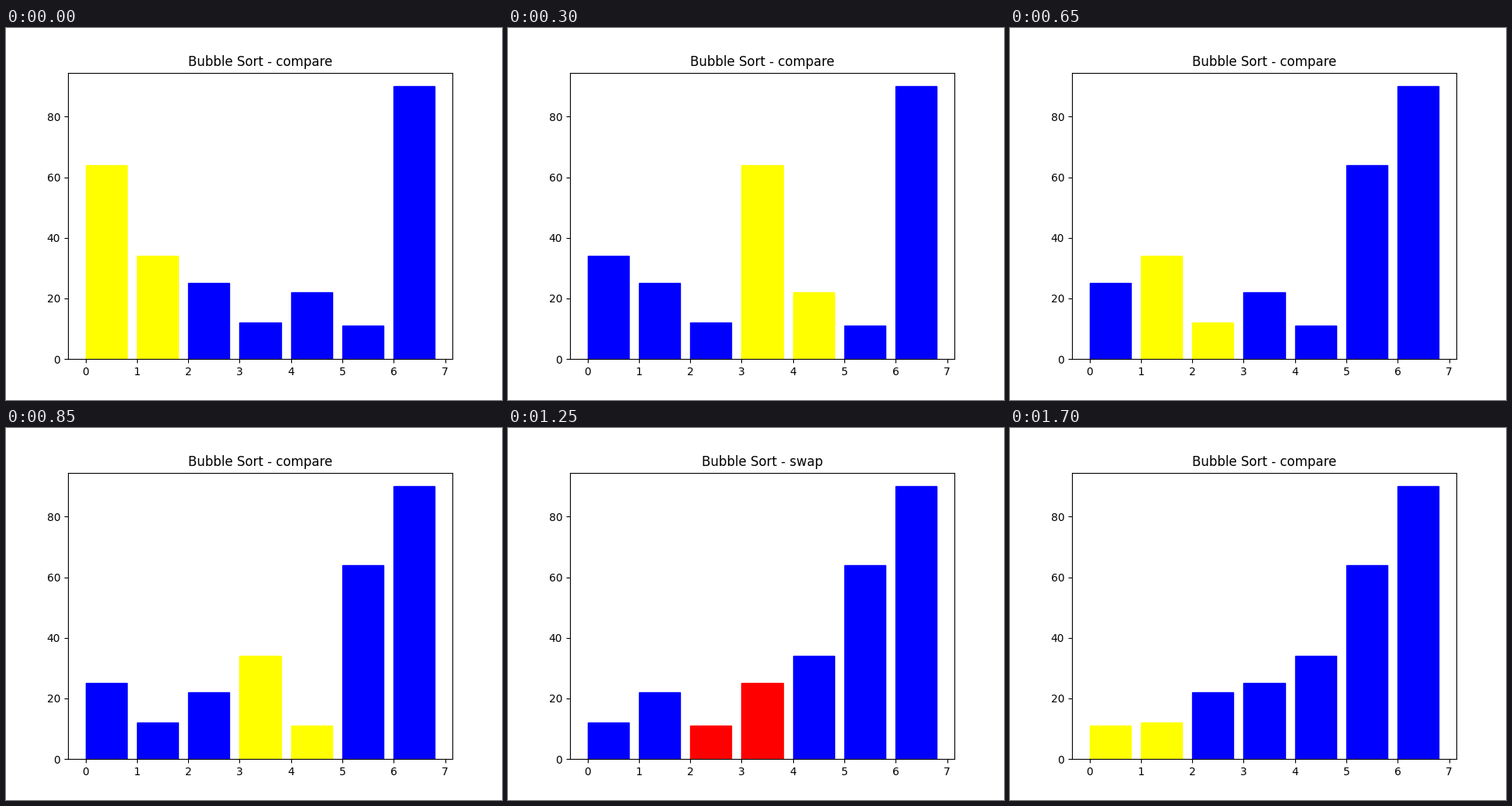
A matplotlib script for the animation above (1.75 s loop, 640 by 480 pixels).

```python
import matplotlib.pyplot as plt
from matplotlib.animation import FuncAnimation

VALUES = [64, 34, 25, 12, 22, 11, 90]
COLORS = {"compare": "yellow", "swap": "red"}


def bubble_steps(values):
    """Yield (heights, left index, action) for every compare and swap."""
    data = list(values)
    for end in range(len(data) - 1, 0, -1):
        for j in range(end):
            yield data[:], j, "compare"
            if data[j] > data[j + 1]:
                data[j], data[j + 1] = data[j + 1], data[j]
                yield data[:], j, "swap"


steps = list(bubble_steps(VALUES))

fig, ax = plt.subplots(figsize=(6.4, 4.8), dpi=100)
bars = ax.bar(range(len(VALUES)), VALUES, align="edge")
title = ax.set_title("")


def update(i):
    heights, left, action = steps[i]
    for k, (bar, height) in enumerate(zip(bars, heights)):
        bar.set_height(height)
        bar.set_color(COLORS[action] if k in (left, left + 1) else "blue")
    title.set_text(f"Bubble Sort - {action}")
    return [*bars, title]


anim = FuncAnimation(fig, update, frames=len(steps), interval=50,
                     repeat=True, repeat_delay=0)
plt.show()
```
